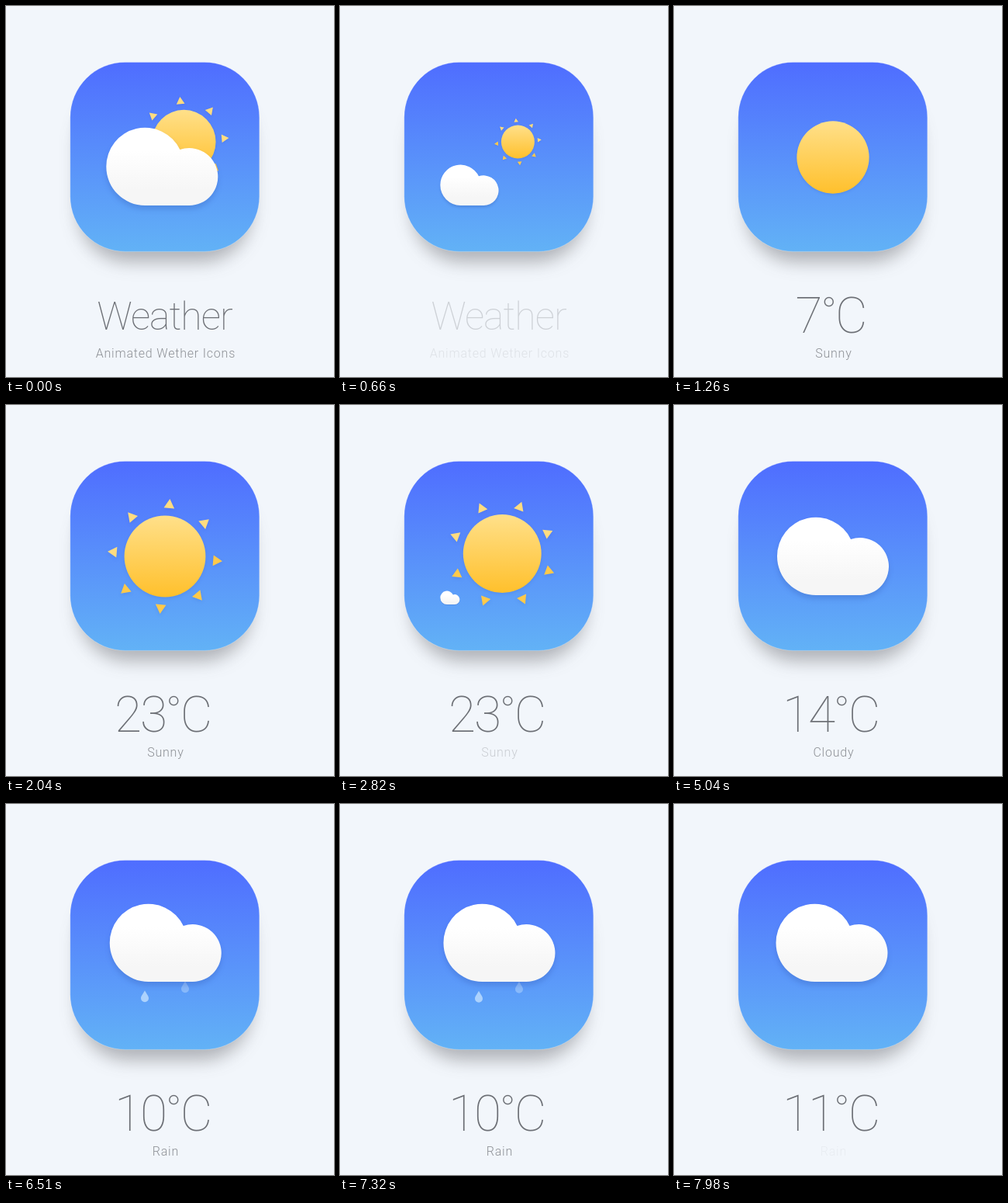
An HTML page that plays this animation: 423x478 px, repeating every 8 s.

```html
<!DOCTYPE html>
<html lang="en">
<head>
<meta charset="utf-8">
<title>Weather</title>
<style>
  html, body { margin: 0; width: 100%; height: 100%; overflow: hidden; background: #f2f6fb; }
  svg { display: block; width: 100%; height: 100%; }
  text { font-family: Roboto, sans-serif; text-anchor: middle; }
  #title, #temp { font-weight: 100; fill: #6c6f75; }
  #title { font-size: 50px; letter-spacing: -1px; }
  #temp { font-size: 64px; letter-spacing: -2px; }
  #label { font-size: 16px; font-weight: 300; letter-spacing: .8px; fill: #8e9196; }
  #shadow { fill: rgba(60, 60, 66, .36); filter: blur(11px); }
  #sun { filter: drop-shadow(0 2px 2px rgba(40, 70, 170, .14)); }
  #cloud { filter: drop-shadow(0 5px 3px rgba(30, 60, 150, .2)); }
</style>
</head>
<body>
<svg viewBox="0 0 423 478">
  <defs>
    <linearGradient id="sky" x2="0" y2="1"><stop stop-color="#4f6dff"/><stop offset="1" stop-color="#62b2f6"/></linearGradient>
    <linearGradient id="gold" x2="0" y2="1"><stop stop-color="#ffe08a"/><stop offset="1" stop-color="#ffc02c"/></linearGradient>
    <linearGradient id="white" x2="0" y2="1"><stop offset=".3" stop-color="#fff"/><stop offset=".8" stop-color="#f6f6f6"/></linearGradient>
    <path id="drop" d="M0-8C2-4 5-1 5 2A5 5 0 0 1-5 2C-5-1-2-4 0-8Z" fill="#d3eaff"/>
  </defs>
  <rect id="shadow" x="93" y="110" width="224" height="220" rx="66"/>
  <rect x="82.8" y="72.4" width="244" height="244" rx="71" fill="url(#sky)" stroke="#fff" stroke-opacity=".25"/>
  <g id="sun">
    <g id="rays"></g>
    <circle r="52.4" fill="url(#gold)"/>
  </g>
  <use class="drop" href="#drop"/>
  <use class="drop" href="#drop"/>
  <g id="cloud">
    <path d="M0-50A50 50 0 0 1 95-72A37 37 0 1 1 107 0H50A50 50 0 0 1 0-50Z" fill="url(#white)"/>
  </g>
  <text id="title" x="204.5" y="416.5">Weather</text>
  <text id="temp" x="202" y="421"><tspan id="degrees"></tspan><tspan font-size="54" dy="-7.5">°</tspan><tspan dy="7.5">C</tspan></text>
  <text id="label" x="205.9" y="453"></text>
</svg>
<script>
const LOOP = 8000;
const $ = id => document.getElementById(id);
const lerp = (a, b, p) => a + (b - a) * p;
const ramp = (t, start, length) => Math.min(1, Math.max(0, (t - start) / length));
const ease = p => p < .5 ? 2 * p * p : 1 - 2 * (1 - p) ** 2;
const move = (t, start, length) => ease(ramp(t, start, length));
const place = (node, x, y, scale = 1) =>
  node.setAttribute('transform', `translate(${x} ${y}) scale(${scale})`);

// label, fade-out time of the previous label, count start, ms per degree, first and last degree
const scenes = [
  ['Animated Wether Icons', -900, 0, 1, 0, 0],
  ['Sunny', 500, 1015, 33, 0, 23],
  ['Partly Cloudy', 2700, 2860, 80, 23, 19],
  ['Cloudy', 3900, 4000, 80, 19, 14],
  ['Rain', 5400, 5500, 80, 14, 10],
  ['', 7800, 7840, 100, 10, 14]
];

const rays = Array.from({ length: 8 }, (_, i) =>
  `<path d="M74.2 0L62.4 6.8V-6.8Z" fill="${i < 4 ? '#ffc94a' : '#ffdc80'}" transform="rotate(${i * 45})"/>`);
$('rays').innerHTML = rays.join('');
const drops = document.querySelectorAll('.drop');

function drawText(t) {
  const i = scenes.findLastIndex(s => t >= s[1]);
  const [label, start, countStart, step, from, to] = scenes[i];
  const fading = i > 0 && t < start + 200;
  $('label').textContent = fading ? scenes[i - 1][0] : label;
  $('label').style.opacity = fading ? 1 - ramp(t, start, 200) : ramp(t, start + 200, 200);

  const count = Math.floor(Math.max(0, t - countStart) / step);
  $('degrees').textContent = from + Math.sign(to - from) * Math.min(count, Math.abs(to - from));
  $('temp').style.opacity = ramp(t, 720, 200);
  $('title').style.opacity = 1 - ramp(t, 500, 220);
}

function drawSun(t) {
  const intro = t < 900;
  const aside = intro ? 1 : move(t, 2650, 580);
  const hide = move(t, 3900, 400);
  const size = intro ? 1 - move(t, 490, 350) : 1 - (1 - ramp(t, 900, 540)) ** 2;
  const x = lerp(lerp(205, 229.4, aside), 205, hide);
  const y = lerp(lerp(195, 175, aside), 195, hide);
  place($('sun'), x, y, size * lerp(1, .785, aside) * (1 - hide));
  const angle = intro ? 40 : 20.5 + (t - 2820) * .02;
  const reach = intro ? 1 : lerp(.6, 1, move(t, 1300, 400));
  $('rays').setAttribute('transform', `rotate(${angle}) scale(${reach})`);
}

function drawCloud(t) {
  const centre = move(t, 3900, 500), lift = move(t, 5400, 500);
  const sway = t > 6326 ? 1.5 * Math.sin((t - 6326) * 2 * Math.PI / 2205) : 0;
  const size = t < 900 ? 1 - move(t, 490, 350) : move(t, 2650, 580);
  place($('cloud'), lerp(129.3, 133, centre) + sway, lerp(257, 245, centre) - 16 * lift, size);
}

function drawDrops(t) {
  drops.forEach((drop, i) => {
    const age = t - 6054 - i * 216;
    const on = age > 0 && age < 1600;
    const p = on ? age / 800 % 1 : 0;
    place(drop, i ? 231 : 179, 223 + 44 * p);
    drop.style.opacity = on ? .68 * Math.min(1, p * 1.8, (1 - p) * 4) : 0;
  });
}

function frame(now) {
  const t = now % LOOP;
  drawText(t);
  drawSun(t);
  drawCloud(t);
  drawDrops(t);
  requestAnimationFrame(frame);
}
requestAnimationFrame(frame);
</script>
</body>
</html>
```
